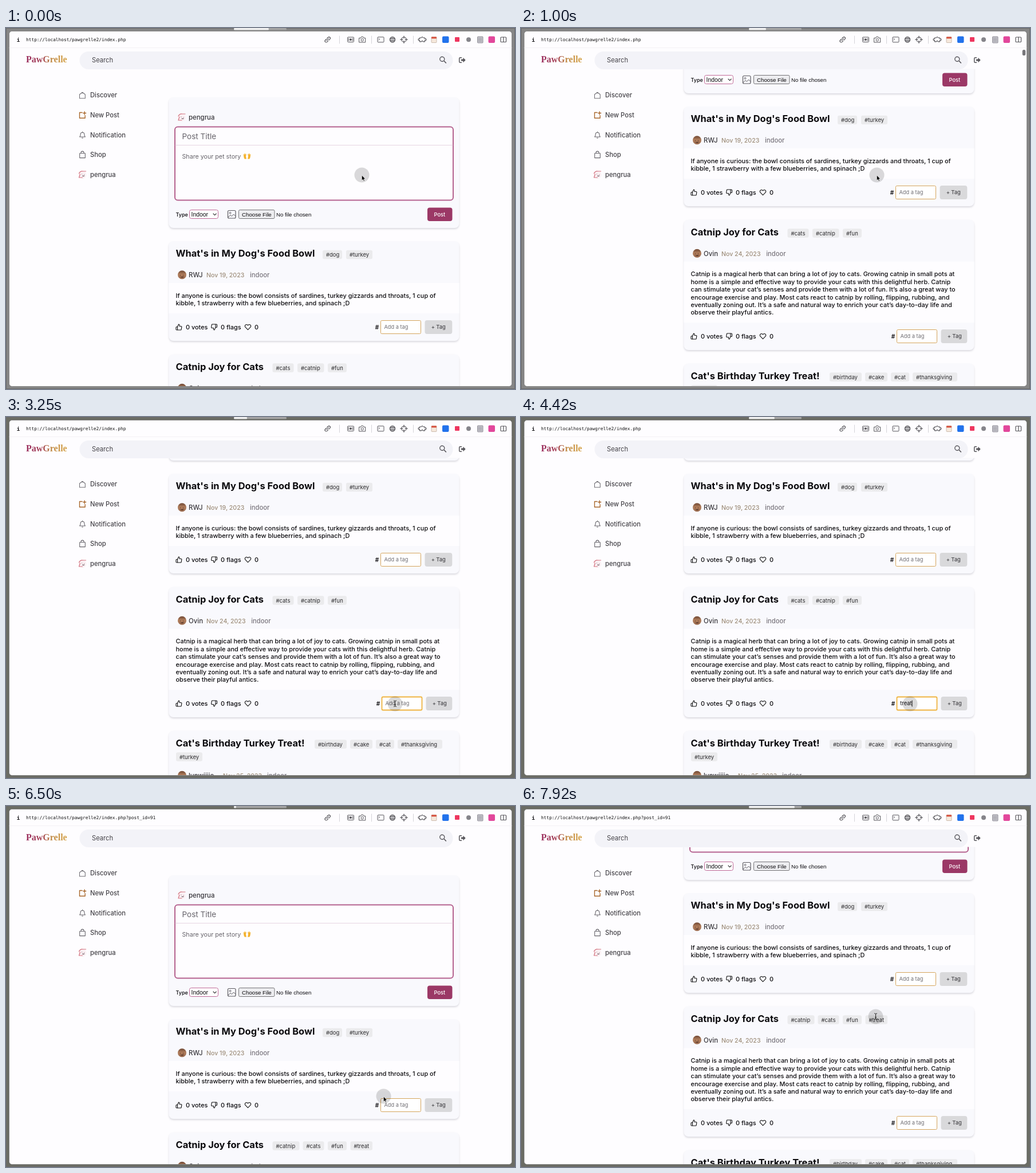
An HTML page that plays this animation: 889x630 px, repeating every 8000 ms.

```html
<!DOCTYPE html>
<html lang="en">
<head>
<meta charset="utf-8">
<title>Pet community page</title>
<style>
html, body { margin: 0; width: 100%; height: 100%; overflow: hidden; background: #868686; }
svg { display: block; width: 889px; height: 630px; }
text { font: 500 10.9px Inter, sans-serif; fill: #0c0b0e; white-space: pre; }
.nav { font-size: 11.2px; fill: #454348; }
.title { font-size: 16.45px; font-weight: 700; }
.tag, .btn { font-size: 9.5px; font-weight: 400; fill: #2c2b2e; }
.btn { font-size: 9.3px; font-weight: 500; fill: #48474b; }
.user { font-size: 11.4px; fill: #39373c; }
.date { font-size: 10.6px; fill: #9e8e7a; }
.kind { font-size: 11.2px; fill: #79757c; }
.hint { font-size: 9.2px; font-weight: 400; fill: #706e73; }
.typed { font-size: 9.4px; font-weight: 400; }
.hash { font-size: 10px; font-weight: 600; }
.sys { font: 9.7px "Liberation Sans", Arial, sans-serif; }
.url { font: 7.83px "DejaVu Sans Mono", monospace; fill: #111; }
.info { font: 700 9px "DejaVu Sans Mono", monospace; }
.brand { font: 700 16px "Liberation Serif", serif; fill: url(#brand); }
.card { filter: drop-shadow(0 2px 1.8px rgba(40, 35, 60, .16)); }
.line { fill: none; stroke-linecap: round; stroke-linejoin: round; }
</style>
</head>
<body>
<script>
const NS = 'http://www.w3.org/2000/svg';

function el(parent, name, attrs = {}, text) {
  const node = document.createElementNS(NS, name);
  for (const k in attrs) node.setAttribute(k, attrs[k]);
  if (text !== undefined) node.textContent = text;
  parent.append(node);
  return node;
}
const group = (p, attrs) => el(p, 'g', attrs);
const text = (p, x, y, str, cls) => el(p, 'text', { x, y, class: cls || '' }, str);
const rect = (p, x, y, width, height, fill, rx = 0, more) =>
  el(p, 'rect', { x, y, width, height, fill, rx, ...more });
const disc = (p, cx, cy, r, fill, more) => el(p, 'circle', { cx, cy, r, fill, ...more });
const line = (p, d, stroke, width = 1, more) =>
  el(p, 'path', { d, stroke, 'stroke-width': width, class: 'line', ...more });
const show = (node, on) => node.setAttribute('visibility', on ? 'visible' : 'hidden');

const svg = el(document.body, 'svg', { viewBox: '0 0 889 630' });
const defs = el(svg, 'defs');
function gradient(id, stops, attrs) {
  const g = el(defs, 'linearGradient', { id, ...attrs });
  for (const [offset, c] of stops) el(g, 'stop', { offset, 'stop-color': c });
}
gradient('brand', [[0, '#9a2d5e'], [.4, '#a8485a'], [.6, '#c08a48'], [1, '#d6a44a']]);
gradient('fur', [[0, '#6f4733'], [.45, '#b07d5b'], [1, '#9a6a4f']], { x2: 0, y2: 1 });
rect(el(defs, 'clipPath', { id: 'view' }), 6, 71.5, 877, 553.5, '#000', 4);

const PAGE = '#fefdff', PANEL = '#f9f9fd';
const desk = rect(svg, 0, 0, 889, 630, '#868686');
rect(svg, .5, .5, 888, 629, 'none', 0, { stroke: '#6a6a6a' });
rect(svg, 398, 0, 92, 3.5, '#a3a3a3', 1.5);
const level = rect(svg, 398, 0, 61, 3.5, '#efefef', 1.5);
rect(svg, 5.5, 5.5, 878, 620, PAGE, 5, { stroke: '#707070', 'stroke-width': .7 });

/* Scrolling page */
const view = group(svg, { 'clip-path': 'url(#view)' });
const page = group(view);

function selfie(p, x, y) {
  disc(p, x, y, 6.8, '#fbf1f4');
  line(p, `M${x - 6} ${y - 2}q2-5 7-4l5 0M${x - 6} ${y + 5}l2-6M${x - 5} ${y + 5}h5`, '#d3727f', 1.2);
  line(p, `M${x - 1} ${y - 1}h.1M${x + 3} ${y}h.1M${x} ${y + 2}q2 1 3 0`, '#6b5560', 1.1);
}

function drawForm(p) {
  const g = group(p);
  rect(g, 284.5, 121, 507, 228, PANEL, 8, { class: 'card' });
  selfie(g, 307, 156);
  text(g, 319, 160.3, 'pengrua', 'user');
  rect(g, 295, 172.5, 486, 128, PAGE, 5, { stroke: '#b5628f', 'stroke-width': 2 });
  line(g, 'M296 204.5H780', '#e6d6e2');
  text(g, 307.5, 194, 'Post Title').style.cssText = 'font-size:13.5px;font-weight:400;fill:#67646b';
  text(g, 307.5, 227.8, 'Share your pet story').style.cssText = 'font-size:10.7px;font-weight:400;fill:#67646b';
  for (const s of [-1, 1]) {
    const hand = group(g, { transform: `translate(421 224) scale(${s} 1)` });
    el(hand, 'path', { d: 'M1 4.5 2 .5 1.3-4 2.4-4.4 3-2 3.4-5 4.5-5 4.7-2 5.4-4 6.2-3.6 5.6 1.5 4.5 4.5Z', fill: '#f4b22e' });
  }
  text(g, 296.5, 328.7, 'Type').style.fontSize = '9px';
  rect(g, 320.5, 317.5, 50, 15, '#fff', 3, { stroke: '#c06a98' });
  text(g, 323.5, 328.6, 'Indoor', 'sys').style.fontSize = '10.4px';
  line(g, 'M362 324l2.6 2.6 2.6-2.6', '#333', 1.1);
  rect(g, 387.5, 318.5, 13.5, 13.5, 'none', 2, { stroke: '#5c5a60', 'stroke-width': 1.2 });
  disc(g, 391.5, 322.8, 1.4, 'none', { stroke: '#5c5a60' });
  line(g, 'M388 330l4-3.5 2.5 2 3-3.5 3.5 3.5', '#5c5a60');
  rect(g, 406.5, 317.5, 62.5, 15, '#ededf0', 2, { stroke: '#757477' });
  text(g, 412, 328.5, 'Choose File', 'sys');
  text(g, 472, 328.5, 'No file chosen', 'sys');
  rect(g, 736, 313.5, 43.5, 23.5, '#9b3866', 4);
  text(g, 747.5, 328.6, 'Post', 'btn').style.fill = '#fff';
}

const THUMB = 'M14 9V5a3 3 0 0 0-3-3l-4 9v11h11.3a2 2 0 0 0 2-1.7l1.4-9a2 2 0 0 0-2-2.3zM7 22H4a2 2 0 0 1-2-2v-7a2 2 0 0 1 2-2h3';
const HEART = 'M20.8 4.6a5.5 5.5 0 0 0-7.8 0L12 5.7l-1-1.1a5.5 5.5 0 0 0-7.8 7.8l1 1L12 21.2l7.8-7.8 1-1a5.5 5.5 0 0 0 0-7.8z';
const LINE = 13.4;

/* tags: [label, x, width, row] */
function drawTags(p, tags) {
  const g = group(p);
  for (const [label, x, w, row = 0] of tags) {
    const y = row * 22;
    rect(g, x, y + 15.8, w, 15.5, '#ebebed', 3);
    text(g, x + 6, y + 27, label, 'tag');
  }
  return g;
}

function drawPost(p, { top, title, user, date, dateX, kindX, tags, lines, drop = 0, inset = 0 }) {
  const g = group(p, { transform: `translate(0 ${top})` });
  const foot = 126 + drop + (lines.length - 2) * LINE;
  rect(g, 284.5, 0, 507, foot + 48, PANEL, 8, { class: 'card' });
  rect(g, 284.5, 73 + drop, 507, foot - 73 - drop, PAGE);
  text(g, 296.5, 27, title, 'title');
  const tagBox = drawTags(g, tags);
  const y = 63.3 + drop;
  disc(g, 307.5, y - 4.5, 7.5, 'url(#fur)');
  line(g, `M304.5 ${y - 4}h.1M309.5 ${y - 4}h.1M305.5 ${y - .8}q2 1 4-.4`, '#4f3024', 1.3);
  text(g, 319, y, user, 'user');
  text(g, dateX, y, date, 'date');
  text(g, kindX, y, 'indoor', 'kind');
  lines.forEach((s, i) => text(g, 296.5, 98.8 + drop + i * LINE, s));

  const mid = Math.round(top + foot + 24) - top;
  const icon = (x, d, scale) => line(g, d, '#111', 2.2,
    { transform: `translate(${x} ${mid}) scale(${scale}) translate(-12 -12)` });
  icon(302, THUMB, .5);
  icon(363.5, THUMB, -.5);
  icon(422.5, HEART, .5);
  text(g, 314, mid + 4, '0 votes');
  text(g, 375, mid + 4, '0 flags');
  text(g, 434, mid + 4, '0');
  text(g, 644.8 + inset, mid + 3.7, '#', 'hash');
  const box = rect(g, 654.5 + inset, mid - 11.5, 70, 23, '#fff', 2, { stroke: '#d5a55c' });
  const hint = text(g, 660.5 + inset, mid + 3.4, 'Add a tag', 'hint');
  rect(g, 731.5 + inset, mid - 12, 47.8 - inset, 24, '#d9d9db', 4);
  text(g, 742.7 + inset, mid + 3.4, '+ Tag', 'btn');
  return { g, tagBox, box, hint, mid };
}

drawForm(page);
drawPost(page, {
  top: 372, title: "What's in My Dog's Food Bowl", user: 'RWJ', date: 'Nov 19, 2023', dateX: 350, kindX: 426,
  tags: [['#dog', 553, 34], ['#turkey', 594, 46]],
  lines: ['If anyone is curious: the bowl consists of sardines, turkey gizzards and throats, 1 cup of',
    'kibble, 1 strawberry with a few blueberries, and spinach ;D']
});
const catnip = drawPost(page, {
  top: 569.5, title: 'Catnip Joy for Cats', user: 'Ovin', date: 'Nov 24, 2023', dateX: 350, kindX: 428.3, inset: 2,
  tags: [['#cats', 465.5, 37], ['#catnip', 509, 46.5], ['#fun', 562, 33]],
  lines: ['Catnip is a magical herb that can bring a lot of joy to cats. Growing catnip in small pots at',
    'home is a simple and effective way to provide your cats with this delightful herb. Catnip',
    'can stimulate your cat’s senses and provide them with a lot of fun. It’s also a great way to',
    'encourage exercise and play. Most cats react to catnip by rolling, flipping, rubbing, and',
    'eventually zoning out. It’s a safe and natural way to enrich your cat’s day-to-day life and',
    'observe their playful antics.']
});
const newTags = drawTags(catnip.g,
  [['#catnip', 465.5, 47], ['#cats', 518.5, 37], ['#fun', 562, 33], ['#treat', 601.5, 38.5]]);
const typed = text(catnip.g, 662.2, catnip.mid + 3.4, '', 'typed');
const caret = rect(catnip.g, 0, catnip.mid - 5.5, 1, 11, '#111');
drawPost(page, {
  top: 820.5, title: "Cat's Birthday Turkey Treat!", user: 'lunwiiijo', date: 'Nov 25, 2023',
  dateX: 379, kindX: 456, drop: 19, lines: ['', '', ''],
  tags: [['#birthday', 539, 56], ['#cake', 601, 39], ['#cat', 646, 32], ['#thanksgiving', 684, 78], ['#turkey', 297, 46, 1]]
});

/* Browser bar */
text(svg, 18.7, 23.8, 'i', 'info');
const url = text(svg, 35, 23.2, '', 'url');
const INK = '#56555a';
const bar = group(svg);
line(bar, 'M582.5 14V27M638.5 14V27M711.5 14V27', '#d4d3d8');
const link = group(bar, { transform: 'translate(561.7 20.3) rotate(-45)' });
line(link, 'M-1 2.2H-3.5A2.2 2.2 0 0 1-3.5-2.2H-1M1-2.2H3.5A2.2 2.2 0 0 1 3.5 2.2H1M-2.3 0H2.3', INK, 1.2);
rect(bar, 596.5, 16, 11, 8.5, 'none', 1, { stroke: INK });
disc(bar, 602, 20.2, 2, INK);
line(bar, 'M598.5 18v4.5M605.5 18v4.5', INK);
line(bar, 'M617 17.5h2.5l1-2h3.4l1 2h2.8v7.5h-10.7z', INK);
disc(bar, 622.2, 20.8, 2.2, 'none', { stroke: INK });
rect(bar, 649, 15.8, 11, 9, 'none', 1, { stroke: INK });
line(bar, 'M651 18.3l1.6 1.4-1.6 1.4', INK);
disc(bar, 675, 20.2, 4.6, 'none', { stroke: INK, 'stroke-width': 1.3 });
line(bar, 'M670.5 18.5h9M670.5 22h9M675 15.6v9.2M673 16q-1.6 4 0 8.4M677 16q1.6 4 0 8.4', INK, .9);
disc(bar, 695, 20.2, 4.2, 'none', { stroke: INK, 'stroke-width': 1.2 });
line(bar, 'M695 14v4M695 22.4v4M688.8 20.2h4M697.2 20.2h4', INK, 1.2);
line(bar, 'M722.5 17h3q1.5-3 3 0h3v2q2.4-.8 2.4 1.2t-2.4 1.2v2.4h-3q-1.5-3-3 0h-3v-2.4q-2.4.8-2.4-1.2t2.4-1.2z', INK, 1.2);
rect(bar, 743, 15.5, 9, 10, '#f6e9dc', 1, { stroke: '#b9a596', 'stroke-width': .7 });
rect(bar, 743, 15.5, 9, 3, '#d8513f', 1);
rect(bar, 762, 14.5, 11.5, 11.5, '#2272ec', 2);
rect(bar, 784, 16, 8, 8, '#ee365f', 1);
disc(bar, 808, 20.2, 4, '#85848a');
rect(bar, 823.5, 15, 9.5, 11, '#c6c5cc', 1, { stroke: '#7e7d86', 'stroke-width': .8 });
line(bar, 'M825 18h6M825 20.5h6M825 23h6', '#8c8b94', .8);
rect(bar, 842.5, 14.5, 11.5, 11.5, '#e2479b', 2);
rect(bar, 864, 16, 9.5, 8.5, 'none', 1, { stroke: INK, 'stroke-width': 1.2 });
line(bar, 'M868.8 16v8.5', INK, 1.2);
line(bar, 'M6 34.5H883', '#f1f0f4', .8);

/* Site header and side menu */
text(svg, 35, 60.3, 'PawGrelle', 'brand');
rect(svg, 128.5, 41, 652, 31, '#f3f3f8', 15.5);
text(svg, 150, 60.3, 'Search').style.cssText = 'font-size:11.2px;font-weight:400;fill:#454348';
disc(svg, 761.8, 54.3, 4, 'none', { stroke: INK, 'stroke-width': 1.4 });
line(svg, 'M765 57.5l3.4 3.4', INK, 1.5);
line(svg, 'M795.5 51.8h-2.3a1.5 1.5 0 0 0-1.5 1.5v5.4a1.5 1.5 0 0 0 1.5 1.5h2.3', INK, 1.5);
el(svg, 'path', { d: 'M795 54.4h3.4v-2.6l4.3 4.2-4.3 4.2v-2.6H795z', fill: INK });

['Discover', 'New Post', 'Notification', 'Shop', 'pengrua'].forEach((s, i) =>
  text(svg, 147, 121.3 + i * 34.65, s, 'nav'));
line(svg, 'M128.5 116l4.9-3.8 4.9 3.8v6.8h-9.8z', '#737177', 1.1);
line(svg, 'M133 147.5h-4.5v9.8h9.6v-4.5M137.2 146v5M134.7 148.5h5', '#a8672b', 1.4);
line(svg, 'M128.7 190q1.5-1.5 1.5-4.5a3.3 3.3 0 0 1 6.6 0q0 3 1.5 4.5zM132.5 192h2M133.5 181v1', '#66646a', 1.1);
line(svg, 'M128.7 218.8h9.6v7.8h-9.6zM131 218.6v-1a2.5 2.5 0 0 1 5 0v1', '#66646a', 1.1);
selfie(svg, 133.5, 256);

const thumb = rect(svg, 875.7, 37, 5.5, 10, '#77767a', 2.5);

/* Pointer */
const pointer = group(svg);
disc(pointer, .5, .5, 13, '#000', { 'fill-opacity': .145 });
const arrow = el(pointer, 'path', {
  d: 'M0 0V11.8L2.7 9.3 4.5 13.2 6.4 12.4 4.7 8.6H8.3Z', transform: 'translate(.3 .8) scale(.8)',
  fill: '#000', stroke: '#fff', 'stroke-width': .9
});
const beam = line(pointer, 'M-1.5-5Q.5-5 .5-3.8V4.2Q.5 5.4-1.5 5.4M2.5-5Q.5-5 .5-3.8M2.5 5.4Q.5 5.4 .5 4.2M-.7 1.8H1.7', '#222', 1);

/* Motion tables */
const PATH = [[0, 621, 256], [1700, 621, 256], [2120, 673, 501], [2500, 673, 501], [2620, 679, 500],
  [4600, 679, 500], [5000, 756, 500], [6120, 756, 500], [6420, 659, 506], [6980, 659, 506], [7700, 619, 367], [8000, 619, 367]];
const LEVEL = [[0, 61], [300, 20], [560, 0], [600, 0], [1000, 30], [2170, 49], [2500, 38], [3000, 55], [3400, 4],
  [3920, 38], [4200, 38], [4420, 45], [5000, 30], [5250, 30], [5700, 60], [6500, 4], [7750, 38], [7917, 80], [8000, 80]];
const WORD = 'treat', KEYS = [3580, 3750, 3910, 4075, 4245];
const RELOAD = 5490, LOOP = 8000;

const clamp = v => Math.min(1, Math.max(0, v));
const smooth = u => u * u * (3 - 2 * u);
function track(keys, t, ease = u => u) {
  const i = Math.max(1, keys.findIndex(k => k[0] > t));
  const a = keys[i - 1], b = keys[i];
  const u = ease(clamp((t - a[0]) / (b[0] - a[0])));
  return a.slice(1).map((v, j) => v + (b[j + 1] - v) * u);
}
function scrollAt(t) {
  if (t < RELOAD) return Math.min(273, 277 * (1 - Math.exp(-Math.max(0, t - 58) / 501.6)));
  return 220 * (1 - (1 - clamp((t - 6500) / 450)) ** 3);
}

function draw(t) {
  const fresh = t >= RELOAD;
  const scroll = Math.round(scrollAt(t));
  page.setAttribute('transform', `translate(0 ${-scroll})`);

  const dim = clamp((t - 2100) / 400);
  const mix = (a, b) => Math.round(a + (b - a) * dim);
  desk.setAttribute('fill', `rgb(${mix(134, 107)},${mix(134, 108)},${mix(134, 100)})`);
  level.setAttribute('width', track(LEVEL, t)[0]);

  url.textContent = 'http://localhost/pawgrelle2/index.php' + (fresh ? '?post_id=91' : '');
  show(catnip.tagBox, !fresh);
  show(newTags, fresh);

  const focus = t >= 2660 && t < 5080;
  const word = fresh ? '' : WORD.slice(0, KEYS.filter(k => t >= k).length);
  catnip.box.setAttribute('stroke', focus ? '#efb440' : '#d5a55c');
  catnip.box.setAttribute('stroke-width', focus ? 1.8 : 1);
  typed.textContent = word;
  show(catnip.hint, !word);
  caret.setAttribute('x', 662.2 + (word ? typed.getComputedTextLength() : 0));
  const typing = t >= KEYS[0] && t < 4700;
  show(caret, focus && (typing || (t - 2660) % 1000 < 500));

  const bars = fresh
    ? clamp((t - 6540) / 40) * clamp((7600 - t) / 300)
    : clamp((t - 60) / 60) * clamp((2100 - t) / 300);
  thumb.setAttribute('opacity', bars);
  thumb.setAttribute('y', 36.6 + scroll / 180);

  const [x, y] = track(PATH, t, smooth);
  pointer.setAttribute('transform', `translate(${x} ${y})`);
  const overText = (t >= 2550 && t < KEYS[0]) || t >= 6580;
  show(beam, overText);
  show(arrow, !overText && !(t >= KEYS[0] && t < 4600));
}

const start = performance.now();
function tick() {
  const t = (performance.now() - start) % LOOP;
  draw(Math.floor((t + 5) * 12 / 1000) * 1000 / 12 % LOOP);
  requestAnimationFrame(tick);
}
tick();
</script>
</body>
</html>
```
